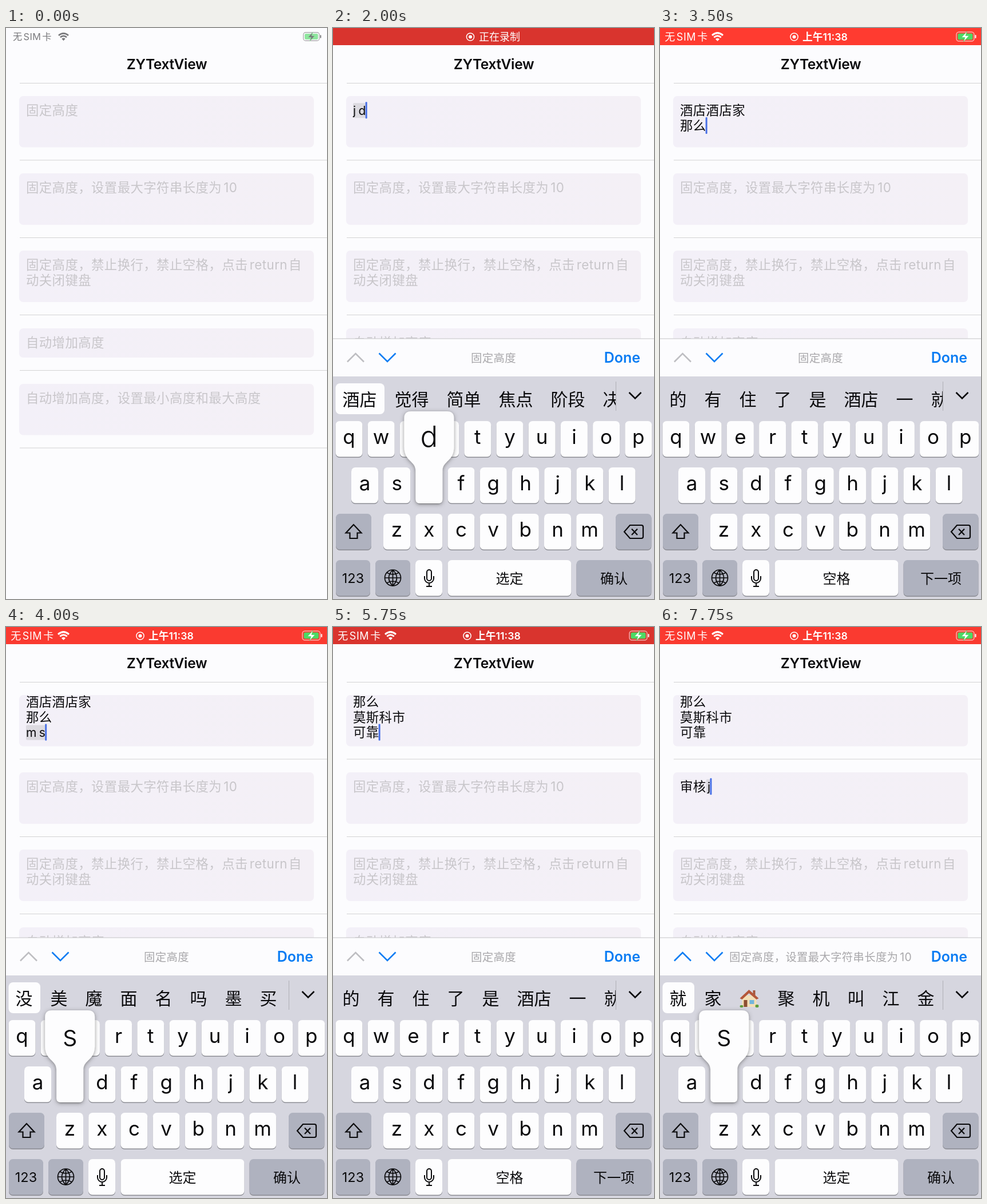
These frames come from a looping animation (561 px wide and 998 px high, 8000 ms). An HTML page:

```html
<!DOCTYPE html>
<html lang="zh-CN">
<head>
<meta charset="utf-8">
<style>
  html, body { margin: 0; width: 100%; height: 100%; overflow: hidden; background: #fcfcfe; }
  svg { display: block; font-family: Inter, "Noto Sans CJK SC", "Noto Sans CJK", sans-serif; }
  .body { font-size: 22.4px; letter-spacing: .42px; }
  .semi { font-weight: 600; }
</style>
</head>
<body>
<svg id="stage" width="561" height="998" viewBox="0 0 561 998"></svg>
<script>
const LOOP = 8000, STEP = 250;
const INK = '#0a0a0c', BLUE = '#087cf3', GREY = '#afb2bf', PALE = '#c8c6ca', WHITE = '#fdfdfe';
const FIELDS = [
  { y: 119, h: 89.5, hint: ['固定高度'] },
  { y: 254, h: 90, hint: ['固定高度，设置最大字符串长度为<tspan dx="3">10</tspan>'] },
  { y: 389, h: 90, hint: ['固定高度，禁止换行，禁止空格，点击<tspan dx="3">return</tspan><tspan dx="2">自</tspan>', '动关闭键盘'] },
  { y: 525, h: 51, hint: ['自动增加高度'] },
  { y: 622, h: 89.5, hint: ['自动增加高度，设置最小高度和最大高度'] }
];
const ROWS = [['qwertyuiop', 4.5], ['asdfghjkl', 32], ['zxcvbnm', 88]];

const START = '我 你 测试 时尚 睡觉 就 都';
const NEXT = '的 有 住 了 是 酒店 一 就';
const J_WORDS = '就 家 ⌂ 聚 机 叫 江 金';
const M_WORDS = '没 美 魔 面 名 吗 墨 买';
const HOTEL = '酒店酒店家\n', MOSCOW = '那么\n莫斯科市';

// time, field, committed text, composing letters, suggestions, popped key, return pressed
const TYPING = [
  [1250, 0, '', '', START],
  [1750, 0, '', 'j', J_WORDS, 'j'],
  [2000, 0, '', 'j d', '酒店 觉得 简单 焦点 阶段 决', 'd'],
  [2250, 0, '酒店', '', NEXT],
  [2500, 0, '酒店酒店', '', NEXT],
  [2750, 0, '酒店酒店家', '', NEXT, '', true],
  [3000, 0, HOTEL, '', START],
  [3250, 0, HOTEL, 'n m', '那么 你们 农民 柠檬 纳米 年', 'm'],
  [3500, 0, HOTEL + '那么', '', NEXT],
  [3750, 0, HOTEL + '那么\n', 'm', M_WORDS, 'm'],
  [4000, 0, HOTEL + '那么\n', 'm s', M_WORDS, 's'],
  [4250, 0, HOTEL + '那么\n', 'm s k s', '莫斯科市 没事 模式 美食 秘书', 'k'],
  [4500, 0, HOTEL + MOSCOW, '', NEXT, '', true],
  [4750, 0, HOTEL + MOSCOW + '\n', 'k', '可 看 快 开 口 克 考 靠', 'k'],
  [5000, 0, HOTEL + MOSCOW + '\n', 'ke k', '可靠 可可 可口 刻苦 苛刻 咳'],
  [5250, 0, HOTEL + MOSCOW + '\n可靠', '', NEXT],
  [6250, 1, '', '', START],
  [7000, 1, '', 's', '是 上 说 时 三 谁 深 水', 's'],
  [7250, 1, '', 's h', '审核 社会 适合 生活 上海 说', 'h'],
  [7500, 1, '审核', '', NEXT],
  [7750, 1, '审核', 'j', J_WORDS, 's']
];

const pen = document.createElement('canvas').getContext('2d');
const widthOf = (s, size) => {
  pen.font = size + 'px Inter, "Noto Sans CJK SC", "Noto Sans CJK", sans-serif';
  return pen.measureText(s).width + s.length * .42;
};

const text = (x, y, size, fill, s, more = '') =>
  `<text x="${x}" y="${y}" font-size="${size}" fill="${fill}" ${more}>${s}</text>`;
const mid = (x, y, size, fill, s, more = '') => text(x, y, size, fill, s, 'text-anchor="middle" ' + more);
const rect = (x, y, w, h, fill, r = 0) =>
  `<rect x="${x}" y="${y}" width="${w}" height="${h}" rx="${r}" fill="${fill}"/>`;
const line = (d, colour, w = 2.2) =>
  `<path d="${d}" fill="none" stroke="${colour}" stroke-width="${w}"/>`;
const bodyText = (x, y, fill, s) => `<text class="body" x="${x}" y="${y}" fill="${fill}">${s}</text>`;
const key = (x, y, w, fill = WHITE) => rect(x, y + 1.5, w, 62.5, '#8b8c93', 7) + rect(x, y, w, 62.5, fill, 7);

function statusIcons(ink, green, size) {
  const item = (cx, s) => `<g transform="translate(${cx} 15) scale(${size})">${s}</g>`;
  return item(46, mid(0, 6.5, 18, ink, '无<tspan dx="2">SIM</tspan><tspan dx="2">卡</tspan>', 'letter-spacing=".6"')) +
    item(100.5, line('M-9.5-2.2Q0-10.5 9.5-2.2M-6.2 1.5Q0-4 6.2 1.5', ink, 3) +
      `<path d="M-3.6 4.3Q0 1.3 3.6 4.3L0 8z" fill="${ink}"/>`) +
    item(535, `<rect x="-17" y="-8" width="31" height="16" rx="4.5" fill="none" stroke="${ink}" stroke-opacity=".6" stroke-width="1.5"/>` +
      rect(-14.5, -5.5, 26, 11, green, 2.5) + rect(15.5, -3, 2, 6, ink, 1) +
      `<path d="M1.5-9L-8 1.5h6L-4.5 9 5-1.5h-6z" fill="${ink}" stroke="${green}" stroke-width=".7"/>`);
}

function statusBar(t) {
  if (t < 750) {
    return `<g opacity="${t ? 1 : .62}">${statusIcons('#29292c', '#4cd964', t ? 1 : .9)}</g>` +
      (t ? mid(281, 21.5, 17.5, '#111', '上午11:38', 'class="semi"') : '');
  }
  const glow = .5 - .5 * Math.cos((t - 1700) / 3750 * 2 * Math.PI);
  const mix = (a, b) => Math.round(a + (b - a) * glow);
  const clock = t >= 3250, x = clock ? 234.5 : 240;
  return rect(0, 0, 561, 30, `rgb(${mix(214, 255)},${mix(52, 59)},${mix(46, 48)})`) +
    `<circle cx="${x}" cy="15.5" r="6.6" fill="none" stroke="#fff" stroke-width="1.5"/><circle cx="${x}" cy="15.5" r="3" fill="#fff"/>` +
    (clock ? statusIcons('#fff', '#4cd964', 1) + text(249, 22, 17.8, '#fff', '上午11:38', 'class="semi"')
           : text(255, 22, 18, '#fff', '正在录制'));
}

function fieldContent(field, typed, mark, focused) {
  const lines = typed.split('\n'), shown = lines.slice(-3);
  const first = field.y + (lines.length > 2 ? 12 : 25.3);
  let out = '';
  if (!typed && !mark) field.hint.forEach((s, i) => out += bodyText(35, first + 8 + i * 27, PALE, s));
  shown.forEach((s, i) => {
    const y = first + i * 26.7, last = i === shown.length - 1;
    const letters = last && mark ? (s && '\u200a') + mark.replace(/ /g, '\u2006') : '';
    const left = 35 + widthOf(s, 22.4), right = left + widthOf(letters, 21);
    if (letters) out += rect(left, y - 13, right - left, 26, '#dcdae0', 2);
    out += bodyText(35, y + 8, INK, s + `<tspan font-size="21">${letters}</tspan>`);
    if (last && focused) out += rect(right - (right > 35 ? 1 : 2), y - 15, 3, 29, '#4870e6', 1);
  });
  return out;
}

function page(current, texts, mark) {
  let out = mid(281, 72, 24.6, INK, 'ZYTextView', 'class="semi" letter-spacing="-.4"') +
    rect(24, 96, 537, 1, '#d3d3d4');
  FIELDS.forEach((f, i) => {
    const focused = i === current;
    out += rect(23, f.y, 515, f.h, 'url(#tint)', 7) +
      fieldContent(f, texts[i] || '', focused ? mark : '', focused) +
      rect(24, f.y + f.h + 22, 537, 1, '#d3d3d4');
  });
  return out;
}

const house = x => `<g transform="translate(${x + 1} 632)">` +
  rect(4, 12, 25, 20, '#f3dfb6') + rect(23, 3, 4, 10, '#a5563c') +
  '<path d="M0 17L16 2 33 17 29 19 16 8 4 19z" fill="#b4573a"/>' +
  rect(7, 20, 6, 12, '#8c4f32') + rect(17, 20, 8, 7, '#72b5dc') + rect(0, 29, 6, 4, '#5f9e3c', 2) +
  rect(27, 28, 6, 5, '#5f9e3c', 2) + '</g>';

function suggestions(words, composing) {
  let x = 16.5, out = '';
  words.split(' ').forEach((w, i) => {
    if (!i && composing) out += rect(4.5, 621, 25.5 + 30 * w.length, 54, WHITE, 8);
    out += w === '⌂' ? house(x) : text(x, 660, 30, INK, w);
    x += 31 + 30 * w.length + (w === '⌂' ? 6 : 0);
  });
  return `<g clip-path="url(#words)">${out}</g>` + rect(494, 618, 1, 51, '#aeaeb5') +
    line('M517.5 637L528 647.5 538.5 637', INK, 2.6);
}

function popup(letter) {
  const r = ROWS.findIndex(([s]) => s.includes(letter));
  const x = ROWS[r][1] + 56.2 * ROWS[r][0].indexOf(letter), y = 687 + 81 * r;
  return `<path filter="url(#lift)" fill="${WHITE}" d="M${x} ${y + 56}V${y + 6}c0-18-20-16-20-42v-50q0-12 12-12h63q12 0 12 12v50c0 26-20 24-20 42v50q0 7-7 7h-33q-7 0-7-7z"/>` +
    mid(x + 23.5, y - 36, 51, INK, letter, 'font-weight="330"');
}

function keyboard(current, mark, words, pop, pressed, drop) {
  let out = rect(0, 543, 561, 67, '#fcfcfe') + rect(0, 542.5, 561, 1, '#c6c6c8') +
    line('M25 583.5L39.5 569 54 583.5', current ? BLUE : '#bebec2', 2.6) +
    line('M80.5 568.5L95 583 109.5 568.5', BLUE, 2.6) +
    mid(280.5, 583.5, 19.4, '#a8a7aa', FIELDS[current].hint[0], 'letter-spacing=".3"') +
    text(537, 585, 25, BLUE, 'Done', 'class="semi" text-anchor="end"') +
    rect(0, 609, 561, 480, '#d6d6df') + suggestions(words, mark);
  ROWS.forEach(([letters, left], r) => [...letters].forEach((c, i) => {
    const x = left + 56.2 * i, y = 687 + 81 * r;
    out += key(x, y, 47) + mid(x + 23.5, y + 39.5, 35, INK, c);
  }));
  out += key(5, 849, 62, GREY) + line('M36 868L22.5 882.5H29.5V892H42.5V882.5H49.5z', INK) +
    key(494, 849, 62.5, GREY) + line('M519 869H539Q542 869 542 872V889Q542 892 539 892H519L509 880.5zM522 875.5L532 886M532 875.5L522 886', INK) +
    key(5, 930, 60, GREY) + mid(35, 970, 23.5, INK, '123') +
    key(74, 930, 61, GREY) + line('M90.5 961a14 14 0 1 0 28 0a14 14 0 1 0-28 0H118.5M104.5 947V975M104.5 947q-14 14 0 28q14-14 0-28M94 952q10.5 6 21 0M94 970q10.5-6 21 0', INK, 1.7) +
    key(144, 930, 47) + line('M164 951a4 4 0 0 1 8 0V962a4 4 0 0 1-8 0zM160 958V962a8 8 0 0 0 16 0V958M168 970V976M163 976H173', INK, 2) +
    key(200.5, 930, 216) + mid(308.5, 970.5, 24, INK, mark ? '选定' : '空格') +
    key(425.5, 930, 131, pressed ? WHITE : GREY) + mid(491, 970.5, 24, INK, mark ? '确认' : '下一项');
  return `<g transform="translate(0 ${drop})">${out}${pop ? popup(pop) : ''}</g>`;
}

const DEFS = `<defs>
  <linearGradient id="tint"><stop stop-color="#f3f0f8"/><stop offset="1" stop-color="#f4f0f6"/></linearGradient>
  <clipPath id="words"><rect y="609" width="494.5" height="78"/></clipPath>
  <filter id="lift" x="-25%" y="-20%" width="150%" height="140%"><feDropShadow dx="0" dy="1.5" stdDeviation="3.5" flood-color="#444" flood-opacity=".6"/></filter>
</defs>`;

function scene(t) {
  const past = TYPING.filter(e => e[0] <= t);
  const texts = [];
  past.forEach(([, field, typed]) => texts[field] = typed);
  const out = DEFS + rect(0, 0, 561, 998, '#fcfcfe') + statusBar(t);
  if (!past.length) return out + page(-1, texts, '');
  const [, field, , mark, words, pop, pressed] = past[past.length - 1];
  return out + page(field, texts, mark) +
    keyboard(field, mark, words, pop, pressed, t < 1500 ? 30.5 : 0);
}

const stage = document.getElementById('stage');
let drawn = -1;
function frame() {
  const t = Math.floor(performance.now() % LOOP / STEP) * STEP;
  if (t !== drawn) stage.innerHTML = scene(drawn = t);
  requestAnimationFrame(frame);
}
frame();
</script>
</body>
</html>
```
